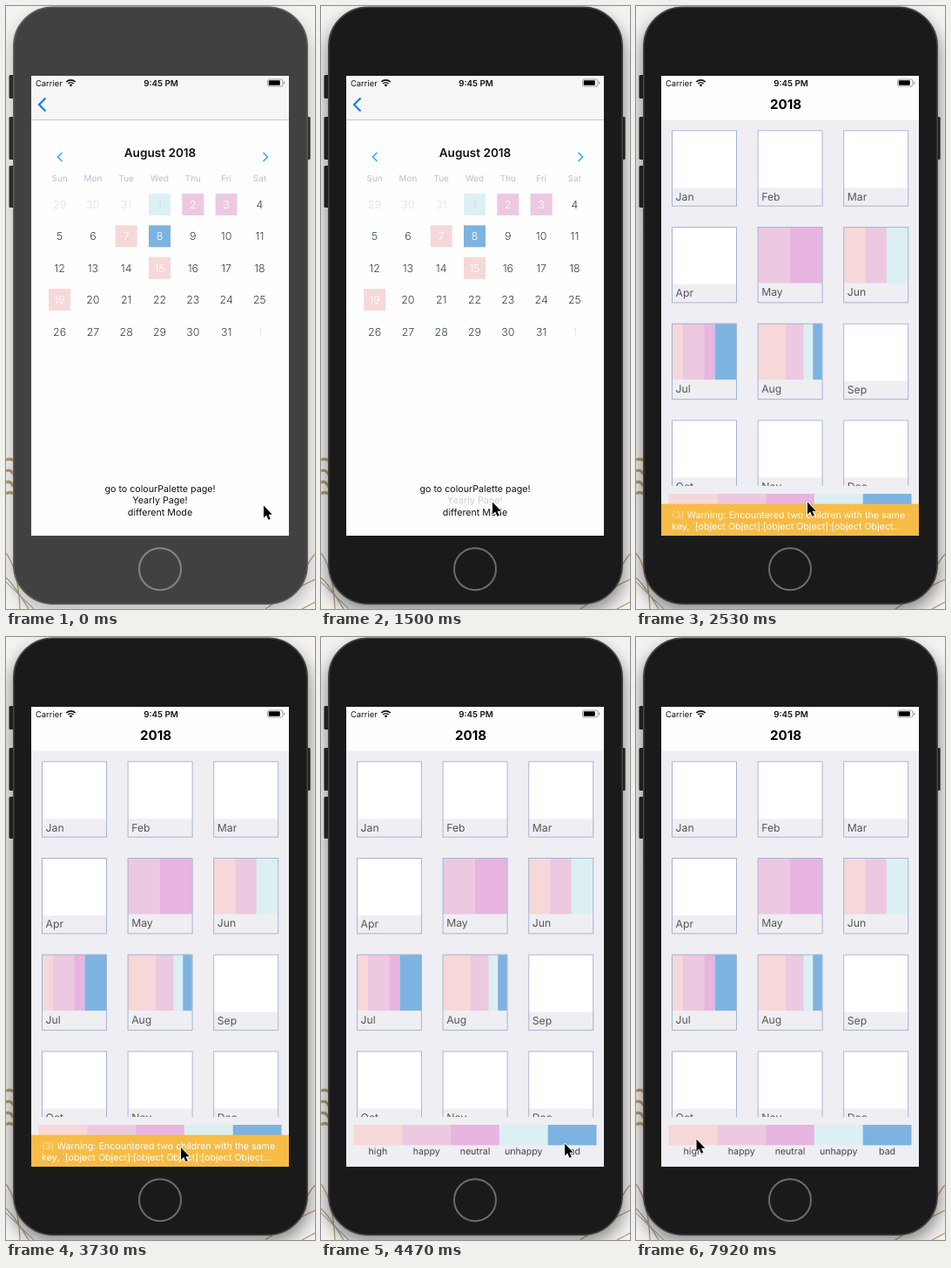
Recreate the animation shown at these times as an HTML page. Size 355 by 691 pixels, loop 8000 ms.

```html
<!DOCTYPE html>
<html lang="en">
<head>
<meta charset="utf-8">
<title>Mood calendar</title>
<style>
html, body { margin: 0; width: 100%; height: 100%; overflow: hidden; background: #f3f2f0; }
svg { display: block; width: 355px; height: 691px; font-family: Inter, "Liberation Sans", sans-serif; text-rendering: geometricPrecision; }
text { white-space: pre; }
</style>
</head>
<body>
<svg id="stage" viewBox="0 0 355 691"></svg>
<script>
const LOOP = 8000;
const MOODS = {
  high: '#f6d8d8', happy: '#ecc9e0', neutral: '#e8b4e0', unhappy: '#dcf0f4', bad: '#7db3e0'
};

const rect = (x, y, w, h, fill, extra = '') =>
  `<rect x="${x}" y="${y}" width="${w}" height="${h}" fill="${fill}" ${extra}/>`;
const line = (d, stroke, width, extra = '') =>
  `<path d="${d}" fill="none" stroke="${stroke}" stroke-width="${width}" ${extra}/>`;
const text = (x, y, str, size, fill, extra = '') =>
  `<text x="${x}" y="${y}" font-size="${size}" fill="${fill}" ${extra}>${str}</text>`;
const centred = (x, y, str, size, fill, extra = '') =>
  text(x, y, str, size, fill, `text-anchor="middle" ${extra}`);

function backdrop() {
  const tan = '#b99a6c';
  return rect(0, 0, 355, 691, '#f3f2f0') +
    line('M0 520Q5 518 9 521M0 533Q5 530 9 537M0 546Q5 543 9 551M0 559Q4 556 9 559', tan, 3.4) +
    line('M0 627Q14 645 16 691M0 655Q10 664 26 691', tan, 1.3) +
    line('M0 660Q12 672 32 691', '#94afc4', 1.2) +
    line('M355 628Q344 640 335 668M355 657Q330 668 298 691M355 683L340 691', tan, 1.3) +
    '<rect id="shadow" x="6" y="10" width="343" height="684" rx="46" filter="url(#blur)"/>';
}

function phone() {
  const keys = [[3.5, 79, 27], [3.5, 127, 49], [3.5, 183, 48], [343, 127, 49]];
  const key = ([x, y, h]) => `<rect x="${x}" y="${y}" width="6.6" height="${h}" rx="1.5"/>`;
  return `<g id="keys">${keys.map(key).join('')}</g>` +
    '<rect id="body" x="8.8" y="1.2" width="337.4" height="684" rx="45" stroke-width="1.6"/>' +
    '<circle id="home" cx="177" cy="645.3" r="24" fill="none" stroke-width="2"/>';
}

function calendar() {
  const colX = c => 61.6 + c * 38.3;
  const marks = { 1: 'unhappy', 2: 'happy', 3: 'happy', 7: 'high', 8: 'bad', 15: 'high', 19: 'high' };
  let out = rect(29, 130, 296, 477, '#fefefe');
  out += centred(177, 173, 'August 2018', 13.6, '#111', 'font-weight="600"');
  out += line('M64.5 168L59.5 173L64.5 178M295.5 168L300.5 173L295.5 178', '#2fb2ee', 1.7);
  ['Sun', 'Mon', 'Tue', 'Wed', 'Thu', 'Fri', 'Sat'].forEach((d, c) => {
    out += centred(colX(c), 201, d, 9.9, '#b6c1cd');
  });
  for (let i = 0; i < 35; i++) {
    const n = i - 2, x = colX(i % 7), y = 227.4 + Math.floor(i / 7) * 36.4;
    const label = n < 1 ? 31 + n : n > 31 ? n - 31 : n;
    const mood = marks[n];
    if (mood) out += rect(x - 12.5, y - 12.5, 25, 25, MOODS[mood]);
    const fill = mood ? (n === 1 ? '#bde5ed' : '#fff') : n < 1 || n > 31 ? '#d9e1e8' : '#2d4150';
    out += centred(x, y + 4.6, label, 12.4, fill, 'font-weight="300"');
  }
  return out + centred(177, 557, 'go to colourPalette page!', 10.7, '#111') +
    centred(177, 570.4, 'Yearly Page!', 10.7, '#111', 'id="yearly"') +
    centred(177, 584, 'different Mode', 10.7, '#111');
}

function bars(x, y, w, h, parts) {
  const total = parts.reduce((sum, [, n]) => sum + n, 0);
  let at = x;
  return parts.map(([mood, n]) => {
    const width = w * n / total, bar = rect(at, y, width, h, MOODS[mood]);
    at += width;
    return bar;
  }).join('');
}

function year() {
  const data = {
    May: [['happy', 1], ['neutral', 1]],
    Jun: [['high', 1], ['happy', 1], ['unhappy', 1]],
    Jul: [['high', 1], ['happy', 2], ['neutral', 1], ['bad', 2]],
    Aug: [['high', 3], ['happy', 2], ['unhappy', 1], ['bad', 1]]
  };
  const cards = 'Jan Feb Mar Apr May Jun Jul Aug Sep Oct Nov Dec'.split(' ').map((name, i) => {
    const x = 41 + (i % 3) * 98.6, y = 142.3 + Math.floor(i / 3) * 110.7, parts = data[name];
    return (parts ? bars(x + .4, y, 73.8, 64.5, parts) : rect(x, y, 75, 66, '#fff')) +
      rect(x + .5, y + .5, 74, 86.4, 'none', 'stroke="#a5b6d3"') +
      text(x + 4.6, y + (parts ? 79 : 80.4), name, 12.2, '#555');
  }).join('');
  const moods = Object.keys(MOODS);
  const legend = bars(37.5, 559, 279, 23.4, moods.map(m => [m, 1])) +
    moods.map((m, i) => centred(65.4 + i * 55.8, 593.3, m, 10.6, '#444')).join('');
  return rect(29, 130, 296, 477, '#000', 'opacity=".3" filter="url(#soft)"') +
    rect(29, 130, 296, 477, '#efeef3') +
    `<g clip-path="url(#list)">${cards}</g>${legend}`;
}

const YELLOW = 'rgb(248,187,64)';

function banner() {
  return rect(29, 570.6, 296, 36.4, YELLOW, 'opacity=".97"') +
    text(41, 587, '<tspan fill-opacity=".5">(3)</tspan> Warning: Encountered two children with the same', 10.7, '#fff') +
    text(41, 600.3, 'key, `[object Object]:[object Object]:[object Object...', 10.7, '#fff');
}

function inspector() {
  // Lines starting with ">" are indented stack entries.
  const lines = `Warning: Encountered two children with the
same key, \`[object Object]:[object Object]:
[object Object]\`. Keys should be unique so
that components maintain their identity
across updates. Non-unique keys may cause
children to be duplicated and/or omitted —
the behavior is unsupported and could change
in a future version.
>RCTScrollContentView (at ScrollView.js:
791)
>RCTScrollView (at ScrollView.js:887)
>ScrollView (at VirtualizedList.js:1024)
>VirtualizedList (at FlatList.js:644)
>FlatList (at Yearly.js:167)
>RCTView (at View.js:60)
>View (at Yearly.js:166)
>Yearly (created by inject-Yearly-with-
rootStore)
>inject-Yearly-with-rootStore (at
navigationStore.js:525)
>Wrapped (at SceneView.js:17)
>SceneView (at CardStack.js:466)
>RCTView (at View.js:60)
>View (at createAnimatedComponent.js:
154)
>AnimatedComponent (at Card.js:12)
>Card (at PointerEventsContainer.js:39)
>Container (at CardStack.js:498)
>RCTView (at View.js:60)`.split('\n');
  const faint = 'opacity=".55"';
  return rect(29, 80, 296, 527, YELLOW, 'opacity=".97"') +
    text(41, 118, 'Warning encountered 3 times.', 10.4, '#fff', 'opacity=".8"') +
    '<path d="M247.5 110.5L254.5 114.3L247.5 118Z" fill="#fff" opacity=".8"/>' +
    text(313, 118, 'Stacktrace', 10.5, '#fff', 'text-anchor="end" opacity=".6"') +
    lines.map((s, i) => {
      const entry = s[0] === '>';
      return text(entry ? 54 : 41, 133.4 + i * 15.07, entry ? 'in ' + s.slice(1) : s, 12, '#fff', 'font-weight="500"');
    }).join('') +
    centred(78, 587, 'Minimize', 10.6, '#fff', faint) +
    centred(177, 587, 'Dismiss', 10.6, '#fff', faint) +
    centred(275.5, 587, 'Dismiss All', 10.6, '#fff', faint);
}

function statusBar() {
  return text(34, 91.8, 'Carrier', 9.4, '#111') +
    line('M69.3 87A7.4 7.4 0 0 1 79.7 87M71.3 89A4.6 4.6 0 0 1 77.7 89', '#111', 1.6) +
    '<path d="M74.5 92.4L72.7 90.4A2.6 2.6 0 0 1 76.3 90.4Z" fill="#111"/>' +
    centred(178, 91.8, '9:45 PM', 9.8, '#111', 'font-weight="600"') +
    rect(300.5, 84, 17.4, 8, 'none', 'rx="2" stroke="#888" stroke-width=".8"') +
    rect(301.8, 85.2, 13, 5.6, '#000', 'rx=".8"') +
    rect(319, 86.5, 1.2, 3, '#999', 'rx=".6"');
}

const stage = document.getElementById('stage');
stage.innerHTML = `<defs>
  <filter id="blur" x="-20%" y="-20%" width="140%" height="140%"><feGaussianBlur stdDeviation="9"/></filter>
  <filter id="soft" x="-20%" y="-20%" width="140%" height="140%"><feGaussianBlur stdDeviation="3.5"/></filter>
  <clipPath id="screen">${rect(29, 80, 296, 527, '#000')}</clipPath>
  <clipPath id="content">${rect(29, 130, 296, 477, '#000')}</clipPath>
  <clipPath id="list">${rect(29, 130, 296, 420, '#000')}</clipPath>
</defs>
${backdrop()}${phone()}
<g clip-path="url(#screen)">
  <g clip-path="url(#content)">
    <g id="calendar">${calendar()}</g>
    ${rect(29, 130, 296, 477, '#000', 'id="dim"')}
    <g id="year">${year()}</g>
  </g>
  ${rect(29, 80, 296, 50.5, '#fefefe')}
  <g id="oldHeader">${rect(29, 80, 296, 50, '#f6f6f6')}${rect(29, 130, 296, 1, '#c8c8ca')}
    ${line('M45.5 105.5L38 113L45.5 120.5', '#157efb', 2.3)}</g>
  <g id="title">${centred(172.1, 118.4, '2018', 15.1, '#000', 'font-weight="700"')}</g>
  <g id="banner">${banner()}</g>
  <g id="inspector">${inspector()}</g>
  ${statusBar()}
</g>
<g id="cursor"><path d="M0 0V14L3.2 11.1L5.5 16.3L7.8 15.3L5.5 10.2H9.8Z" fill="#000" stroke="#fff" stroke-width="1.6" paint-order="stroke" stroke-linejoin="round"/></g>`;

const el = {};
stage.querySelectorAll('[id]').forEach(node => el[node.id] = node);
const set = (id, name, value) => el[id].setAttribute(name, value);
const show = (id, on) => set(id, 'visibility', on ? 'visible' : 'hidden');

// Pointer stops: [time, x, y]
const POINTER = [
  [0, 296, 572.5], [600, 283, 570], [750, 250, 565], [900, 222, 562.5], [1050, 204, 563], [1200, 197, 567],
  [1500, 197, 568.5], [3580, 199, 577], [3730, 201, 585], [4020, 225, 585], [4170, 258, 583], [4320, 280, 580.5],
  [4920, 215, 410], [5070, 142, 297], [5520, 150, 297], [5670, 168, 294], [5820, 185, 292.5], [5970, 245, 295],
  [6120, 302, 300], [6420, 255, 335], [6570, 180, 375], [6720, 110, 409], [6870, 83, 420],
  [7620, 80, 465], [7770, 72, 540], [7920, 69.5, 575.5]
];

// Cubic bezier (.2833, .99, .3183, .99)
function slideEase(x) {
  if (x <= 0) return 0;
  if (x >= 1) return 1;
  const curve = (s, a, b) => 3 * (1 - s) ** 2 * s * a + 3 * (1 - s) * s * s * b + s ** 3;
  let lo = 0, hi = 1;
  for (let i = 0; i < 24; i++) {
    const mid = (lo + hi) / 2;
    if (curve(mid, .2833, .3183) < x) lo = mid; else hi = mid;
  }
  return curve(lo, .99, .99);
}

function render(t) {
  const active = t >= 1500;
  set('body', 'fill', active ? '#1a1a1a' : '#414141');
  set('body', 'stroke', active ? '#444' : '#5c5c5c');
  set('keys', 'fill', active ? '#1f1f1f' : '#2c2c2c');
  set('home', 'stroke', active ? '#6c6c6c' : '#858585');
  set('shadow', 'opacity', active ? .42 : .22);
  set('yearly', 'opacity', active ? .2 : 1);

  const sampled = 1940 + Math.floor((t - 1940) / 147.5) * 147.5;
  const p = t < 1940 ? 0 : slideEase((sampled - 1871) / 500);
  set('calendar', 'transform', `translate(${-89 * p})`);
  set('dim', 'opacity', .15 * p);
  set('year', 'transform', `translate(${296 * (1 - p)})`);
  show('year', p > 0);
  set('oldHeader', 'opacity', Math.max(0, 1 - 1.6 * p));
  set('title', 'opacity', Math.min(1, 1.1 * p));

  show('banner', t >= 1940 && t < 3880);
  show('inspector', t >= 3880 && t < 4470);

  const [, x, y] = POINTER.filter(stop => stop[0] <= t).pop();
  set('cursor', 'transform', `translate(${x} ${y})`);
}

const start = performance.now();
function tick() {
  render((performance.now() - start) % LOOP);
  requestAnimationFrame(tick);
}
tick();
</script>
</body>
</html>
```
